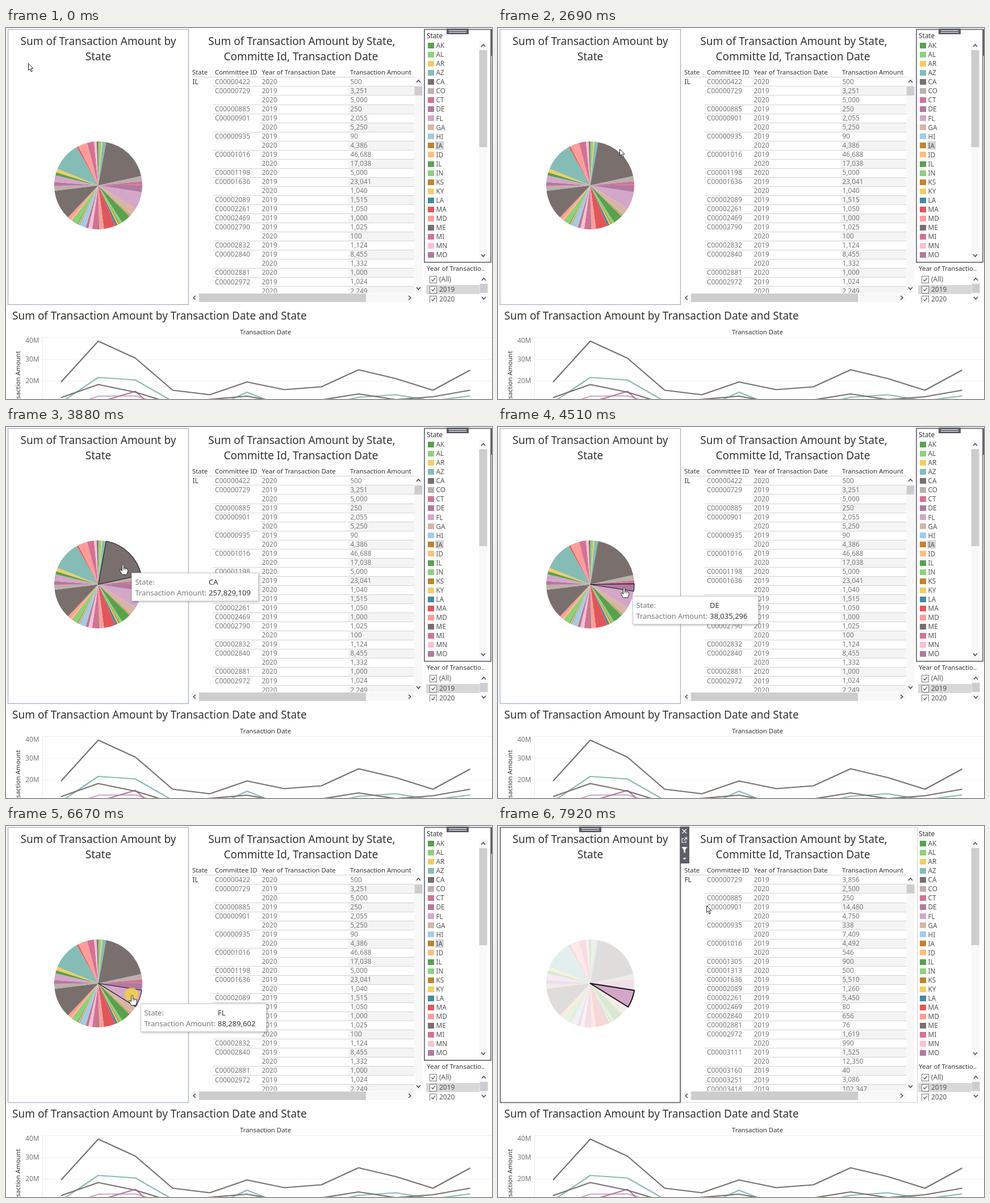
Recreate the animation shown at these times as an HTML page with a canvas. Size 856 px wide and 654 px high, loop 8 s.

```html
<!DOCTYPE html>
<html lang="en">
<head>
<meta charset="utf-8">
<title>Transaction dashboard</title>
<style>
html, body { margin: 0; width: 100%; height: 100%; overflow: hidden; background: #fff; }
canvas { display: block; width: 100vw; height: 100vh; }
</style>
</head>
<body>
<canvas id="stage" width="856" height="654"></canvas>
<script>
const c = document.getElementById('stage').getContext('2d');
const LOOP = 8000;
const FONT = '"Noto Sans", "Open Sans", sans-serif';
const DARK = '#5b5f68';
const PITCH = 16.04;

const COLORS = {
  green: '#59a14f', lime: '#8cd17d', yellow: '#f1ce63', teal: '#86bcb6', gray: '#79706e',
  silver: '#bab0ac', rose: '#d37295', purple: '#b07aa1', lilac: '#d4a6c8', tan: '#d7b5a6',
  blue: '#a0cbe8', brown: '#c08431', orange: '#ffbe7d', sea: '#468a9a', red: '#e15759',
  pink: '#ff9d9a', blush: '#fabfd2'
};

const LEGEND = ('AK green,AL lime,AR yellow,AZ teal,CA gray,CO silver,CT rose,DE purple,FL lilac,GA tan,' +
  'HI blue,IA brown,ID orange,IL green,IN lime,KS brown,KY yellow,LA sea,MA red,MD pink,ME gray,' +
  'MI rose,MN blush,MO purple').split(',').map(s => s.split(' '));

// Each slice: colour and the clockwise angle where it ends, in degrees from the top.
const PIE = { x: 162.5, y: 277.5, r: 77.5 };
let from = 0;
const SLICES = ('green .8,lime 4,yellow 5.5,teal 10.4,gray 77.7,silver 84.7,rose 89.2,purple 98.9,lilac 121.9,' +
  'tan 132.3,blue 132.7,brown 134,orange 134.6,green 147.2,lime 150.8,brown 152.4,yellow 154,sea 157,red 172.5,' +
  'pink 179,gray 180.3,rose 188,blush 193,purple 196.6,tan 198,blue 205.3,brown 206.3,orange 207.5,' +
  'green 208.8,lime 216.4,brown 216.9,yellow 218.6,pink 223.4,gray 262.9,silver 269,rose 270.3,purple 274.5,' +
  'lilac 283.2,green 287.4,yellow 292.2,teal 330.9,red 333,pink 345.3,rose 354.4,blush 358,gray 360')
  .split(',').map(s => {
    const [name, end] = s.split(' ');
    const slice = { color: COLORS[name], from, to: +end };
    from = +end;
    return slice;
  });
const SELECTED = SLICES[8];

const AMOUNTS = { CA: '257,829,109', CO: '26,918,405', CT: '17,164,250', DE: '38,035,296', FL: '88,289,602' };

const parseRows = s => s.split('|').map(r => r.split(' '));
const TABLES = {
  IL: parseRows('422 20 500|729 19 3,251|- 20 5,000|885 19 250|901 19 2,055|- 20 5,250|935 19 90|- 20 4,386|' +
    '1016 19 46,688|- 20 17,038|1198 20 5,000|1636 19 23,041|- 20 1,040|2089 19 1,515|2261 19 1,050|' +
    '2469 19 1,000|2790 19 1,025|- 20 100|2832 19 1,124|2840 19 8,455|- 20 1,332|2881 20 1,000|2972 19 1,024|- 20 2,249'),
  FL: parseRows('729 19 3,856|- 20 2,500|885 20 250|901 19 14,480|- 20 4,750|935 19 338|- 20 7,409|1016 19 4,492|' +
    '- 20 546|1305 19 900|1313 20 500|1636 19 5,510|2089 19 1,260|2261 19 5,450|2469 19 80|2840 19 656|' +
    '2881 19 76|2972 19 1,619|- 20 990|3111 19 1,525|- 20 12,350|3160 19 40|3251 19 3,086|3418 19 102,347')
};

const LINES = [
  ['lilac', [672, 649, 648.5, 668]],
  ['purple', [676, 660, 640.5, 700]],
  ['teal', [660, 616, 620.5, 658, 672, 642, 668, 665, 651, 646.5, 657, 648.5]],
  ['gray', [651.5, 628.5, 642, 662, 654.5, 649, 661, 655.5, 645, 655, 650, 638.5]],
  ['gray', [624, 552, 582, 638.5, 646.5, 624, 637.5, 632.5, 602.5, 618, 638.5, 603]]
];

// The pointer is sampled in discrete steps: start, end, count.
const STEPS = [[670, 1460, 11], [1530, 1830, 5], [2140, 2930, 11], [3010, 3330, 5],
  [3880, 4510, 9], [5130, 5590, 7], [7610, 7920, 5]];
const PATH = [[592, 39, 62], [1060, 150, 63], [1460, 254, 64], [1830, 284, 65], [2060, 284, 65],
  [2300, 272, 92], [2693, 214, 213], [2772, 212, 228], [2851, 206, 236], [2930, 203, 233], [3010, 203, 231],
  [3330, 206, 242], [3880, 206, 242], [4190, 214, 262], [4431, 225, 286], [4510, 222, 283],
  [5050, 222, 283], [5283, 222, 292], [5513, 223, 300], [5590, 222, 298], [7530, 222, 298],
  [7690, 265, 253], [7920, 367, 140]];

function snap(t) {
  let out = 0;
  for (const [a, b, n] of STEPS) {
    if (t + 8 < a) break;
    const d = (b - a) / (n - 1);
    out = a + Math.min(n - 1, Math.floor((t - a + 8) / d)) * d;
  }
  return out;
}

function pointerAt(t) {
  const s = snap(t);
  if (s <= PATH[0][0]) return PATH[0].slice(1);
  const i = PATH.findIndex(p => p[0] >= s - 0.01);
  if (i < 1) return PATH[PATH.length - 1].slice(1);
  const [a, ax, ay] = PATH[i - 1], [b, bx, by] = PATH[i];
  const u = (s - a) / (b - a);
  return [Math.round(ax + (bx - ax) * u), Math.round(ay + (by - ay) * u)];
}

function text(s, x, mid, size, color, align = 'left', weight = 400) {
  c.font = `${weight} ${size}px ${FONT}`;
  c.fillStyle = color;
  c.textAlign = align;
  c.fillText(s, x, mid + size * 0.357);
}

function rect(x, y, w, h, color) {
  c.fillStyle = color;
  c.fillRect(x, y, w, h);
}

function frame(x, y, w, h, color, width = 1) {
  c.strokeStyle = color;
  c.lineWidth = width;
  c.strokeRect(x, y, w, h);
}

function poly(points, color, width) {
  c.beginPath();
  points.forEach(([x, y]) => c.lineTo(x, y));
  c.strokeStyle = color;
  c.lineWidth = width;
  c.stroke();
}

function shape(x, y, path, fill, stroke) {
  c.save();
  c.translate(x, y);
  const p = new Path2D(path);
  c.fillStyle = fill;
  c.fill(p);
  if (stroke) {
    c.strokeStyle = stroke;
    c.lineWidth = 1;
    c.stroke(p);
  }
  c.restore();
}

function chevron(x, y, dx, dy) {
  const s = 3.5;
  poly([[x - dx * 2 - dy * s, y - dy * 2 - dx * s], [x + dx * 2, y + dy * 2],
    [x - dx * 2 + dy * s, y - dy * 2 + dx * s]], '#505050', 1.6);
}

function scrollbar(x, top, bottom, thumbTop, thumbHeight) {
  rect(x - 7, top - 8, 14, bottom - top + 16, '#f8f8f8');
  rect(x - 7, thumbTop, 14, thumbHeight, '#cdcdcd');
  chevron(x, top, 0, -1);
  chevron(x, bottom, 0, 1);
}

function handle(x) {
  rect(x, 1, 39, 10, DARK);
  rect(x + 4, 4, 31, 1, '#fff');
  rect(x + 4, 7, 31, 1, '#fff');
}

function slicePath(s, r) {
  const rad = a => (a - 90) * Math.PI / 180;
  c.beginPath();
  c.moveTo(PIE.x, PIE.y);
  c.arc(PIE.x, PIE.y, r, rad(s.from), rad(s.to));
  c.closePath();
}

function sliceUnder(x, y) {
  const dx = x - PIE.x, dy = y - PIE.y;
  if (Math.hypot(dx, dy) > PIE.r) return -1;
  const a = (Math.atan2(dx, -dy) * 180 / Math.PI + 360) % 360;
  return SLICES.findIndex(s => a < s.to);
}

function pie(picked, hover) {
  c.globalAlpha = picked ? 0.24 : 1;
  for (const s of SLICES) {
    slicePath(s, PIE.r);
    c.fillStyle = s.color;
    c.fill();
  }
  c.globalAlpha = 1;
  c.lineJoin = 'round';
  c.strokeStyle = '#111';
  if (picked) {
    slicePath(SELECTED, PIE.r + 1);
    c.fillStyle = SELECTED.color;
    c.fill();
    c.lineWidth = 2;
    c.stroke();
  } else if (hover >= 0) {
    slicePath(SLICES[hover], PIE.r);
    c.lineWidth = 1.1;
    c.stroke();
  }
  c.lineJoin = 'miter';
}

function table(state) {
  text('Sum of Transaction Amount by State,', 521, 23, 19, '#333', 'center');
  text('Committe Id, Transaction Date', 519.5, 50, 19, '#333', 'center');
  [['State', 328], ['Committee ID', 368], ['Year of Transaction Date', 450.5], ['Transaction Amount', 606]]
    .forEach(([s, x]) => text(s, x, 78, 11.4, '#333', 'left', 500));
  c.save();
  c.beginPath();
  c.rect(324, 80, 395, 387);
  c.clip();
  rect(328, 86, 391, 1, '#cfcfcf');
  text(state, 328.5, 94.5, 11.8, '#333');
  TABLES[state].forEach(([id, year, amount], i) => {
    const top = 86.4 + PITCH * i, mid = top + 8;
    if (i % 2) rect(603, top, 116, PITCH, '#f4f4f4');
    if (i) {
      const x = id === '-' ? 447 : 364;
      rect(x, Math.round(top), 719 - x, 1, '#d2d2d2');
    }
    if (id !== '-') text('C' + id.padStart(8, '0'), 368, mid, 11.9, '#777');
    text('20' + year, 450.5, mid, 11.9, '#777');
    text(amount, 606.5, mid, 11.8, '#777');
  });
  c.restore();
  scrollbar(726.5, 94, 459, 103, 16);
  rect(325, 468, 394, 15, '#f8f8f8');
  rect(340, 468, 294, 15, '#cdcdcd');
  chevron(332, 475.5, -1, 0);
  chevron(711, 475.5, 1, 0);
}

function legend(highlight) {
  text('State', 741, 14, 11.8, '#333');
  LEGEND.forEach(([name, color], i) => {
    const y = 31 + PITCH * i;
    if (highlight && name === 'IA') rect(756, y - 8, 15, 15, '#d6d6d6');
    rect(743, Math.round(y) - 5, 11, 10, COLORS[color]);
    text(name, 757.5, y, 11.8, '#555');
  });
  scrollbar(840.5, 31, 401, 39, 171);
}

function yearFilter() {
  text('Year of Transactio..', 741, 424, 11.5, '#333', 'left', 500);
  c.save();
  c.beginPath();
  c.rect(738, 432, 116, 52);
  c.clip();
  rect(740, 453, 94, 16, '#d8d8d8');
  ['(All)', '2019', '2020'].forEach((s, i) => {
    const y = 443 + i * 17.5;
    const top = Math.round(y - 6) + 0.5;
    rect(746, top, 12, 12, '#fff');
    frame(746.5, top, 12, 12, '#777');
    poly([[749.5, y + 0.5], [751.7, y + 3], [755.8, y - 2.5]], '#444', 1.2);
    text(s, 763, y, 12, '#555');
  });
  scrollbar(841.5, 443, 476, 451, 16);
  c.restore();
}

function lineChart() {
  text('Sum of Transaction Amount by Transaction Date and State', 11, 507, 19, '#333');
  text('Transaction Date', 457, 536, 11.4, '#333', 'center', 500);
  [545, 584, 622].forEach(y => rect(64, y, 792, 1, '#f0f0f0'));
  rect(64, 545, 1, 109, '#ececec');
  [['40M', 551], ['30M', 584], ['20M', 622]].forEach(([s, y]) => text(s, 58.5, y, 11.8, '#777', 'right'));
  c.save();
  c.translate(21, 569.5);
  c.rotate(-Math.PI / 2);
  text('Transaction Amount', 0, 0, 11.4, '#333', 'right', 500);
  c.restore();
  c.lineJoin = 'round';
  for (const [color, ys] of LINES) {
    poly(ys.map((y, i) => [97 + 65.5 * i, y]), COLORS[color], 2.2);
  }
  c.lineJoin = 'miter';
}

function toolbar() {
  rect(321, 1, 16, 65, DARK);
  poly([[324.5, 5.5], [332, 13]], '#fff', 1.3);
  poly([[332, 5.5], [324.5, 13]], '#fff', 1.3);
  poly([[327.5, 22], [324, 22], [324, 29], [331, 29], [331, 25.5]], '#fff', 1.1);
  poly([[327.5, 25.5], [332.5, 20.5]], '#fff', 1.1);
  poly([[329, 20.5], [332.5, 20.5], [332.5, 24]], '#fff', 1.1);
  shape(328.5, 37, 'M-5 0H5L1.5 5V11L-1.5 9V5Z', '#fff');
  shape(328.5, 56, 'M-3 0H3L0 3.5Z', '#fff');
}

function tooltip(x, y, state) {
  const w = state === 'CA' ? 224 : 222;
  c.save();
  c.shadowColor = 'rgba(0,0,0,.32)';
  c.shadowBlur = 4;
  c.shadowOffsetX = c.shadowOffsetY = 1;
  rect(x, y, w, 50, '#fff');
  c.restore();
  frame(x + 0.5, y + 0.5, w - 1, 49, '#cfcfcf');
  text('State:', x + 6.5, y + 16.5, 12.9, '#787878');
  text('Transaction Amount:', x + 6.5, y + 35, 12.9, '#787878');
  text(state, x + 136, y + 16.5, 12.9, '#333', 'left', 500);
  text(AMOUNTS[state], x + 136, y + 35, 13, '#333', 'left', 500);
}

function draw(t) {
  const [x, y] = pointerAt(t);
  const active = t >= 6750, picked = t >= 7130;
  const hovering = t >= 2764 && t < 7604;
  const hover = hovering ? sliceUnder(x, y) : -1;

  rect(0, 0, 856, 654, '#fff');
  text('Sum of Transaction Amount by', 162.5, 23, 19, '#333', 'center');
  text('State', 162.5, 50, 19, '#333', 'center');
  pie(picked, hover);
  table(t >= 7290 ? 'FL' : 'IL');
  legend(!picked);
  yearFilter();
  lineChart();

  if (t >= 7750) frame(322.5, 2.5, 416, 485, '#cfcfcf');
  if (active) {
    frame(4, 2.5, 317, 485, DARK, 1.6);
    handle(143);
    toolbar();
  } else {
    frame(3.5, 2.5, 318, 485, '#a5b1c4', 1.3);
    frame(737, 2.5, 117, 410.5, DARK, 1.6);
    handle(776);
    rect(854, 2, 2, 47, DARK);
  }

  const state = hover >= 0 && LEGEND[hover] ? LEGEND[hover][0] : '';
  if (AMOUNTS[state]) tooltip(x + 15, y + 15, state);
  if (t >= 6670 && t < 6820) {
    c.beginPath();
    c.arc(221, 297, 12, 0, Math.PI * 2);
    c.fillStyle = 'rgba(238,210,70,.88)';
    c.fill();
  }
  if (hovering) {
    shape(x, y, 'M-1.5 1.5Q0-.5 1.5 1.5V7Q3 5.8 4 7.4Q5.6 6.5 6.4 8.2Q8.5 7.6 8.5 10V13L6.5 18H-1.5' +
      'L-5.3 11.5Q-6 9.4-4 9.4L-1.5 11.7Z', '#fff', '#222');
    poly([[x + 1.5, y + 7], [x + 1.5, y + 10]], '#222', 0.8);
    poly([[x + 4, y + 8], [x + 4, y + 10.5]], '#222', 0.8);
  } else {
    shape(x + 0.5, y + 0.5, 'M0 0V12L2.7 9.5L4.8 14.5L6.8 13.6L4.7 8.8H8.4Z', '#fff', '#222');
  }
}

function tick() {
  draw(performance.now() % LOOP);
  requestAnimationFrame(tick);
}
tick();
</script>
</body>
</html>
```
